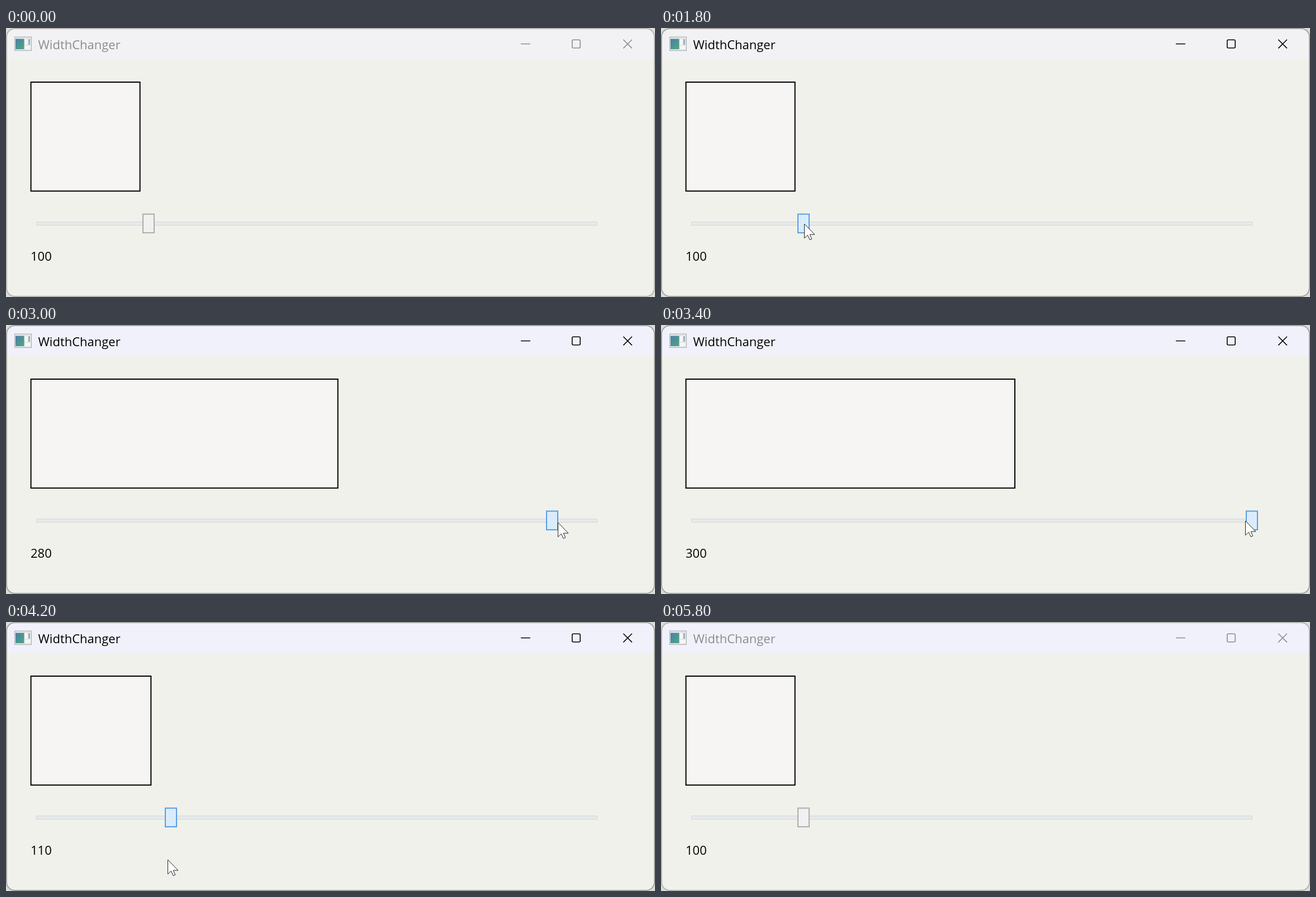
Write an HTML page that moves like this. It is 1161 px wide and 482 px high and loops after 6200 ms.

```html
<!DOCTYPE html>
<html lang="en">
<head>
<meta charset="utf-8">
<title>WidthChanger</title>
<style>
  html, body { margin: 0; width: 100%; height: 100%; overflow: hidden; background: #dcdcda; }
  svg { display: block; width: 1161px; height: 482px; }
  text { font: 22px "Open Sans", "Noto Sans", sans-serif; }
</style>
</head>
<body>
<svg viewBox="0 0 1161 482">
  <defs>
    <clipPath id="frame"><rect x="1" y="1" width="1159" height="480" rx="15"/></clipPath>
    <linearGradient id="screen" x2="1" y2="1">
      <stop stop-color="#4a7fa4"/><stop offset="1" stop-color="#4fa884"/>
    </linearGradient>
  </defs>
  <g clip-path="url(#frame)">
    <rect width="1161" height="482" fill="#f0f1ea"/>
    <rect id="bar" width="1161" height="56"/>
  </g>
  <rect id="border" x="1" y="1" width="1159" height="480" rx="15" fill="none" stroke-width="2"/>

  <!-- window icon -->
  <rect x="15.5" y="16" width="30" height="24.5" fill="#e3e5e6" stroke="#a9acae"/>
  <rect x="17" y="19.5" width="15.5" height="18.5" fill="url(#screen)"/>
  <path d="M33.5 20h5v10h-5zM33.5 32h10v6h-10z" fill="#f6f6f6"/>
  <rect x="40" y="20" width="3" height="10" fill="#9fb3bb"/>

  <text id="title" x="57.5" y="38">WidthChanger</text>
  <g id="buttons" fill="none" stroke-width="1.6">
    <path d="M921 28.5h17M1104.3 20.8l15.6 15.6m0-15.6l-15.6 15.6"/>
    <rect x="1012.8" y="21.3" width="14.4" height="14.4" rx="2"/>
  </g>

  <rect id="box" x="44.6" y="97" height="195.2" fill="#f6f5f4" stroke="#000" stroke-width="2"/>
  <rect x="54.5" y="347.5" width="1003" height="6" fill="#e7eaea" stroke="#d6d6d6"/>
  <rect id="thumb" y="333.5" width="20" height="33.4" stroke-width="2"/>
  <text id="value" x="44" y="416.5"></text>
  <path id="cursor" d="M.5 1V26.7L6.3 21.2L10.2 29.5L13.8 28L10.2 20H19Z" fill="#fff" stroke="#222"/>
</svg>
<script>
const LOOP = 6200, STEP = 200, ENTER = 800, HOVER = 1200, PRESS = 1800, HIDE = 5400, LEAVE = 5800;
const smooth = k => k * k * (3 - 2 * k);
const easeOut = n => k => 1 - (1 - k) ** n;

// each move starts where the last one ended; bow dips the path downwards
const moves = [
  { from: ENTER, to: 1400, x: 256, y: 350, ease: easeOut(2) },
  { from: PRESS, to: 3240, x: 1045, y: 350, ease: smooth, bow: 6 },
  { from: 3400, to: 4800, x: 263, y: 411, ease: easeOut(4), bow: 16.5 },
  { from: 4800, to: 5200, x: 257, y: 418, ease: smooth }
];

const $ = id => document.getElementById(id);
const set = (id, attrs) => {
  for (const k in attrs) $(id).setAttribute(k, attrs[k]);
};

function pointer(t) {
  let x = 294, y = 439;
  for (const m of moves) {
    const k = Math.min(1, Math.max(0, (t - m.from) / (m.to - m.from)));
    x += (m.x - x) * m.ease(k);
    y += (m.y - y) * m.ease(k) + (m.bow || 0) * Math.sin(Math.PI * k);
  }
  return [x, y];
}

function draw(t) {
  const [px, py] = pointer(t);
  const active = t >= PRESS && t < LEAVE;
  const hover = t >= HOVER && t < PRESS;

  // the slider snaps to tens
  const raw = 100 + (px - 256) / 4.01;
  const value = active ? Math.min(300, Math.max(100, Math.round(raw / 10) * 10)) : 100;

  const ink = active ? "#000" : "#8c8c8c";
  set("bar", { fill: t > PRESS ? "#f1f1fb" : "#f2f2f4" });
  set("border", { stroke: active ? "#a4a4a3" : "#b5b5b3" });
  set("title", { fill: ink });
  set("buttons", { stroke: ink });
  set("box", { width: value * 1.9667 - 1.6 });
  set("thumb", {
    x: Math.round(245 + (value - 100) * 4.01),
    fill: active ? "#daecfc" : hover ? "#dcecfc" : "#f0f0f0",
    stroke: active ? "#569de5" : hover ? "#7eb4ea" : "#acacac"
  });
  $("value").textContent = value;
  set("cursor", {
    transform: `translate(${Math.round(px)} ${Math.round(py)})`,
    visibility: t >= ENTER && t < HIDE ? "visible" : "hidden"
  });
}

const start = performance.now();
function tick() {
  const t = (performance.now() - start) % LOOP;
  draw(Math.floor(t / STEP) * STEP);
  requestAnimationFrame(tick);
}
tick();
</script>
</body>
</html>
```
